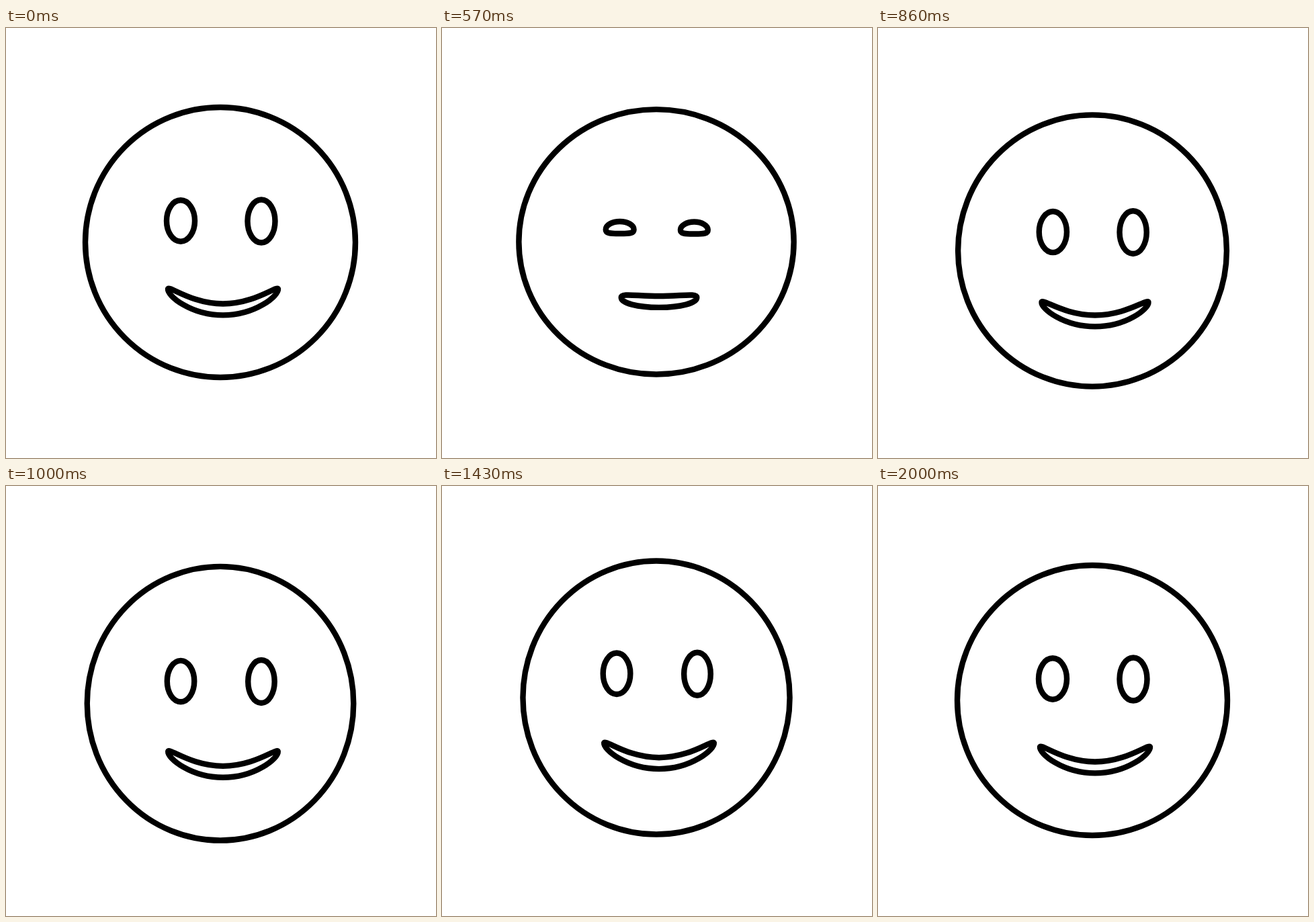
Write an HTML page with a canvas that moves like this. It is 640 px wide and 640 px high and loops after 2.07 s.

```html
<!DOCTYPE html>
<html lang="en">
<head>
<meta charset="utf-8">
<title>Smiley</title>
<style>
html, body { margin: 0; width: 100%; height: 100%; overflow: hidden; background: #fff; }
canvas { display: block; width: 640px; height: 640px; }
</style>
</head>
<body>
<canvas id="stage" width="640" height="640"></canvas>
<script>
const ctx = document.getElementById("stage").getContext("2d");
const LOOP = 2070, STEPS = 29;

// Offsets from the resting face: hop up, squash, sink, rebound, settle.
const rest = { t: 0, head: 0, stretch: 0, eyes: 0, mouth: 0, smile: 1 };
const poses = [
  rest,
  { t: 290, head: -10, stretch: 1, eyes: -28, mouth: -45, smile: 0 },
  { t: 570, head: -0.7, stretch: -0.85, eyes: 13, mouth: -11.5, smile: 0.2 },
  { t: 860, head: 12.5, stretch: 0.25, eyes: 16.6, mouth: 17, smile: 0.915 },
  { t: 1140, head: -3.5, stretch: 0.8, eyes: -8, mouth: -6, smile: 0.98 },
  { ...rest, t: 2000 }
];

const mix = (a, b, k) => a + (b - a) * k;
const clamp = x => Math.min(1, Math.max(0, x));

function ease(from, to, t) {
  const u = clamp((t - from) / (to - from));
  return u * u * (3 - 2 * u);
}

// Speed through a pose; the loop starts and ends at rest.
function speed(i, key) {
  const a = poses[i - 1], b = poses[i + 1];
  return a && b ? (b[key] - a[key]) / (b.t - a.t) : 0;
}

function poseAt(t) {
  let i = 0;
  while (i < poses.length - 2 && t >= poses[i + 1].t) i++;
  const a = poses[i], b = poses[i + 1], d = b.t - a.t;
  const u = clamp((t - a.t) / d), w = 1 - u, p = {};
  for (const key in rest) {
    p[key] = mix(a[key], b[key], u * u * (3 - 2 * u))
      + d * u * w * (w * speed(i, key) - u * speed(i + 1, key));
  }
  p.smile = clamp(p.smile);
  p.squint = ease(290, 570, t) * (1 - ease(620, 850, t));
  return p;
}

function drawHead(p) {
  ctx.beginPath();
  ctx.ellipse(319, 319 + p.head, 201 - 4.3 * p.stretch, 201 + 4.5 * p.stretch, 0, 0, Math.PI * 2);
  ctx.stroke();
}

function drawEye(x, y, rx, ry, q) {
  const K = 0.552;
  const up = mix(ry, 12, q), down = mix(ry, 6, q);
  const kx = mix(K, 0.72, q), ky = mix(K, 0.95, q);
  ctx.beginPath();
  ctx.moveTo(x - rx, y);
  ctx.bezierCurveTo(x - rx, y - up * K, x - rx * K, y - up, x, y - up);
  ctx.bezierCurveTo(x + rx * K, y - up, x + rx, y - up * K, x + rx, y);
  ctx.bezierCurveTo(x + rx, y + down * ky, x + rx * kx, y + down, x, y + down);
  ctx.bezierCurveTo(x - rx * kx, y + down, x - rx, y + down * ky, x - rx, y);
  ctx.closePath();
  ctx.stroke();
}

function drawEyes(p) {
  const narrow = 1 - Math.pow(p.smile, 0.4);
  const gap = 60 - 9.8 * narrow, y = 287 + p.eyes;
  const rx = 21 - 1.2 * p.stretch - 2.3 * narrow;
  const ry = 30.7 - 3.7 * narrow;
  drawEye(320 - gap, y, rx, ry, p.squint);
  drawEye(320 + gap, y + 0.5, rx - 0.5, ry + 1.3, p.squint);
}

function drawMouth(p) {
  const s = p.smile, x = 323, top = 410.5 + p.mouth, low = top + 16.9;
  const half = mix(47.5, 82, Math.pow(s, 0.85));
  const tip = top + mix(8, -22, s);
  const rise = tip - mix(7, 5.5, s), fall = tip + mix(8, 10, s);
  const hTop = mix(31, 47, s), hLow = mix(28, 48, s);
  ctx.beginPath();
  ctx.moveTo(x - half, tip);
  ctx.bezierCurveTo(x - half + 2 * s, rise, x - hTop, top, x, top);
  ctx.bezierCurveTo(x + hTop, top, x + half - 2 * s, rise, x + half, tip);
  ctx.bezierCurveTo(x + half + s, fall, x + hLow, low, x, low);
  ctx.bezierCurveTo(x - hLow, low, x - half - s, fall, x - half, tip);
  ctx.closePath();
  ctx.stroke();
}

// Steps fall on whole hundredths of a second.
const stepTime = k => Math.round(k * 50 / 7) * 10;

function draw(now) {
  const t = now % LOOP;
  let k = STEPS - 1;
  while (k > 0 && stepTime(k) > t) k--;
  const p = poseAt(stepTime(k));

  ctx.fillStyle = "#fff";
  ctx.fillRect(0, 0, 640, 640);
  ctx.strokeStyle = "#000";
  ctx.lineWidth = 8.4;
  ctx.lineJoin = "round";
  drawHead(p);
  drawEyes(p);
  drawMouth(p);
}

const start = performance.now();
function tick() {
  draw(performance.now() - start);
  requestAnimationFrame(tick);
}
tick();
</script>
</body>
</html>
```
